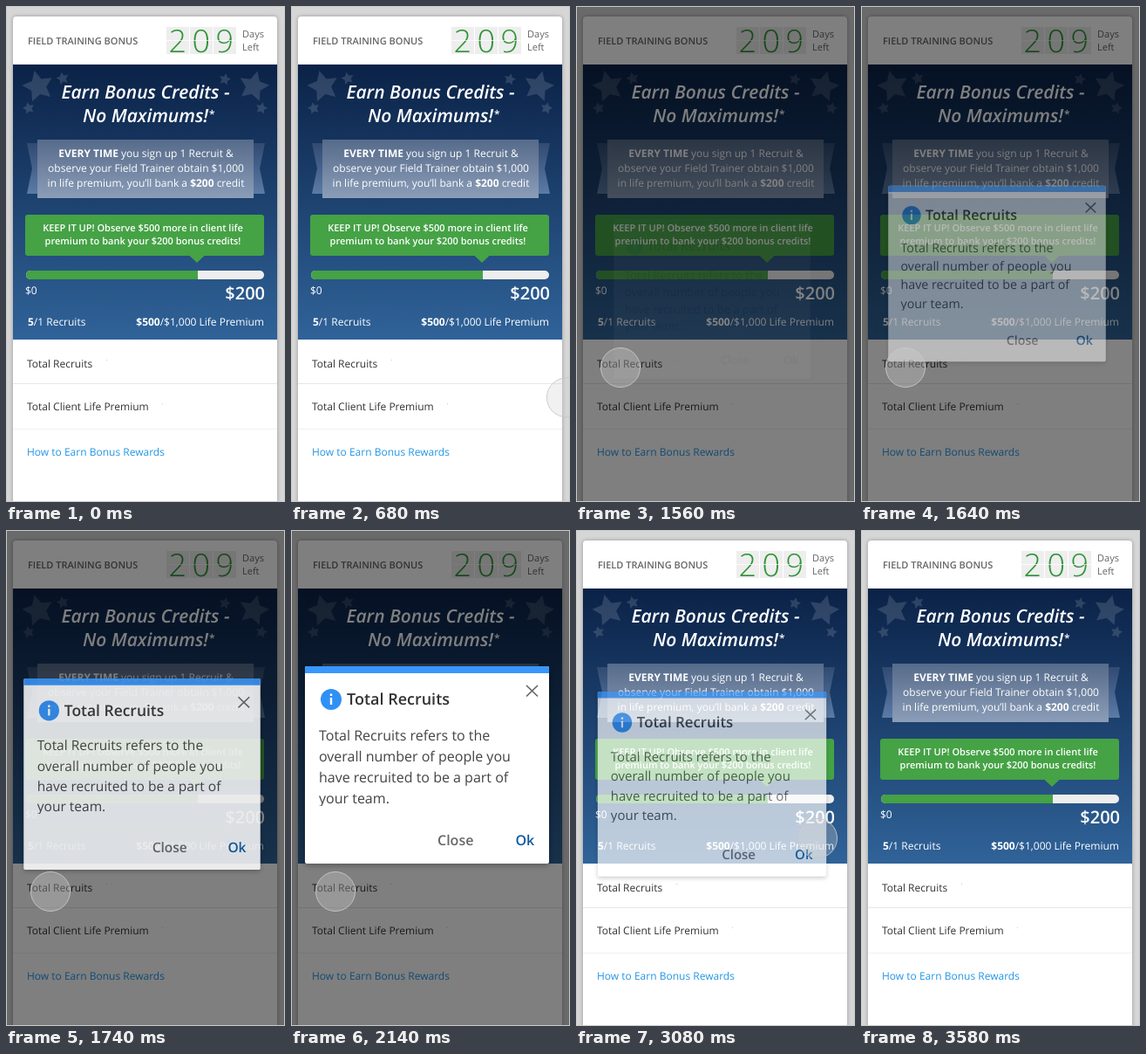
Animation, 320 px wide and 568 px high, one loop 4740 ms. Source, as an HTML page:

```html
<!DOCTYPE html>
<html lang="en">
<head>
<meta charset="utf-8">
<title>Field Training Bonus</title>
<style>
  html, body { margin: 0; height: 100%; overflow: hidden; background: #d6d6d6; }
  #stage { display: block; width: 100vw; height: 100vh; }
  text { font: 12px "Open Sans", sans-serif; fill: #333; text-rendering: geometricPrecision; }
  .mid { text-anchor: middle; }
  .end { text-anchor: end; }
  .semi { font-weight: 600; }
  .bold { font-weight: 700; }
  .white text, text.white { fill: #fff; }
  .small { font-size: 11px; }
  .grey { fill: #666; }
  .title { font-size: 21px; font-weight: 600; font-style: italic; }
  .digit { font-size: 36px; font-weight: 300; fill: #2f9437; }
  .body { font-size: 16px; fill: #444; }
  .panel { filter: drop-shadow(0 0 2px rgba(0, 0, 0, .3)); }
  .card { filter: drop-shadow(0 2px 3px rgba(0, 0, 0, .3)); }
</style>
</head>
<body>
<svg id="stage" viewBox="0 0 320 568">
  <defs>
    <linearGradient id="sky" x2="0" y2="1">
      <stop stop-color="#0b2247"/><stop offset="1" stop-color="#306399"/>
    </linearGradient>
    <linearGradient id="band" x2="0" y2="1">
      <stop stop-color="#566b8a"/><stop offset="1" stop-color="#8b9db8"/>
    </linearGradient>
    <linearGradient id="tail" x2="0" y2="1">
      <stop stop-color="#314a72"/><stop offset="1" stop-color="#5b7ba5"/>
    </linearGradient>
  </defs>

  <rect width="320" height="568" fill="#d6d6d6"/>
  <rect class="panel" x="8" y="12" width="303" height="570" rx="4" fill="#fff"/>

  <!-- header -->
  <text class="small semi grey" x="25" y="44">FIELD TRAINING BONUS</text>
  <g id="counter"></g>
  <text class="small grey" x="271" y="36">Days</text>
  <text class="small grey" x="271" y="51">Left</text>

  <!-- bonus area -->
  <rect x="8" y="67" width="303" height="315" fill="url(#sky)"/>
  <g id="stars" fill="#fff" fill-opacity=".14"></g>
  <g class="white">
    <text class="title mid" x="160" y="106">Earn Bonus Credits -</text>
    <text class="title mid" x="160" y="133">No Maximums!</text>
    <text class="semi" x="233" y="128">*</text>
    <path fill="url(#tail)" d="M24 157H36V215H24L30 186ZM284 157H297L291 186L297 215H284Z"/>
    <rect x="36" y="153" width="248" height="67" fill="url(#band)"/>
    <text class="mid" x="160.5" y="173"><tspan class="bold">EVERY TIME</tspan> you sign up 1 Recruit &amp;</text>
    <text class="mid" x="160.5" y="190">observe your Field Trainer obtain $1,000</text>
    <text class="mid" x="160.5" y="207">in life premium, you’ll bank a <tspan class="bold">$200</tspan> credit</text>

    <rect x="22" y="239" width="274" height="47" rx="3" fill="#45a245"/>
    <path d="M210 285.500H228L219 294Z" fill="#45a245"/>
    <text class="small semi mid" x="157" y="258">KEEP IT UP! Observe $500 more in client life</text>
    <text class="small semi mid" x="157" y="273">premium to bank your $200 bonus credits!</text>

    <rect x="23" y="303" width="273" height="10" rx="5" fill="#eee"/>
    <path d="M220 303H28a5 5 0 0 0 0 10H220Z" fill="#45a245"/>
    <text x="22" y="330">$0</text>
    <text class="semi end" style="font-size:20px" x="297" y="336">$200</text>
    <text x="25" y="366"><tspan class="bold">5</tspan>/1 Recruits</text>
    <text class="end" x="296" y="366"><tspan class="bold">$500</tspan>/$1,000 Life Premium</text>
  </g>

  <!-- list -->
  <text x="24" y="414">Total Recruits</text>
  <text x="24" y="463">Total Client Life Premium</text>
  <text x="24" y="515" style="fill:#2396e6">How to Earn Bonus Rewards</text>
  <path d="M8 432.500H311" stroke="#e6e6e6"/>
  <path d="M8 484.500H311" stroke="#f0f0f0"/>
  <path d="M115 405h1v1h-1zM179 455h1v1h-1z" fill="#ccc"/>

  <rect x=".5" y=".5" width="319" height="567" fill="none" stroke="#cacaca"/>
  <rect id="shade" x="1" y="1" width="318" height="566" fill-opacity=".5"/>

  <g id="modal">
    <rect class="card" x="16" y="156" width="280" height="226" rx="2" fill="#fff"/>
    <path d="M16 164V158a2 2 0 0 1 2-2H294a2 2 0 0 1 2 2V164Z" fill="#3797fd"/>
    <circle cx="46" cy="194" r="12" fill="#3090f5"/>
    <path d="M46 192V200M46 187.500V190" stroke="#fff" stroke-width="2.400"/>
    <text class="semi" style="font-size:18px" x="64" y="200">Total Recruits</text>
    <path d="M270 178L283 190.500M283 178L270 190.500" stroke="#666" stroke-width="1.700"/>
    <svg width="320" height="316">
      <text class="body" x="32" y="241">Total Recruits refers to the</text>
      <text class="body" x="32" y="265">overall number of people you</text>
      <text class="body" x="32" y="289">have recruited to be a part of</text>
      <text class="body" x="32" y="313">your team.</text>
    </svg>
    <text class="body semi" style="fill:#686868" x="168" y="361">Close</text>
    <text class="body semi" style="fill:#0c58a0" x="257.500" y="361">Ok</text>
  </g>

  <circle id="touch" r="22.500" fill="rgba(210,210,210,.3)" stroke="rgba(200,200,200,.9)"/>
</svg>
<script>
const LOOP = 4740, STEP = 20;
const $ = id => document.getElementById(id);
const shade = $('shade'), modal = $('modal'), touch = $('touch');

$('counter').innerHTML = [...'209'].map((digit, i) => {
  const x = 184 + 27 * i;
  return `<rect x="${x}" y="24" width="26" height="31" fill="#eee"/>
    <text class="digit mid" x="${x + 12.8}" y="53">${digit}</text>
    <path d="M${x} 39.500h26" stroke="#fff" stroke-opacity=".7"/>`;
}).join('');

function star(x, y, r, tilt) {
  const points = Array.from({ length: 10 }, (_, i) => {
    const a = (i * 36 - 90 + tilt) * Math.PI / 180, d = i % 2 ? r * .5 : r;
    return `${(x + d * Math.cos(a)).toFixed(1)},${(y + d * Math.sin(a)).toFixed(1)}`;
  });
  return `<polygon points="${points.join(' ')}"/>`;
}
$('stars').innerHTML =
  star(37, 92, 18.5, -14) + star(65, 83, 7.5, -14) + star(26, 117, 7, -14) +
  star(284, 92, 18, 14) + star(251, 84, 7, 14) + star(293, 117, 7, 14);

const clamp = v => Math.min(1, Math.max(0, v));
const part = (t, start, length) => clamp((t - start) / length);
const mix = (a, b, k) => a + (b - a) * k;
const easeOut = k => 1 - (1 - k) ** 3;
const easeInOut = k => k < .5 ? 4 * k ** 3 : 1 - 4 * (1 - k) ** 3;

// cubic-bezier(.25, .1, .25, 1)
function ease(x) {
  const curve = (s, a, b) => 3 * (1 - s) ** 2 * s * a + 3 * (1 - s) * s * s * b + s ** 3;
  let low = 0, high = 1;
  for (let i = 0; i < 24; i++) {
    const s = (low + high) / 2;
    if (curve(s, .25, .25) < x) low = s; else high = s;
  }
  return curve(low, .1, 1);
}

function touchAt(t) {
  if (t < 2120) {
    const k = easeOut(part(t, 660, 400));
    return [mix(360, 51, k), mix(454, 414, k)];
  }
  if (t < 3480) {
    const k = easeInOut(part(t, 2120, 540));
    return [mix(51, 277, k), mix(414, 353, k)];
  }
  const k = part(t, 3480, 100) ** 2;
  return [mix(277, 352, k), mix(353, 297, k)];
}

function openness(t) {
  if (t < 1560) return 0;
  if (t < 3080) return ease(part(t, 1542, 360));
  return 1 - ease(part(t, 3011, 330));
}

function draw(now) {
  const t = Math.floor(now % LOOP / STEP) * STEP;
  const [x, y] = touchAt(t);
  const pressed = t >= 1200 && t < 1340 || t >= 2900 && t < 3040;
  touch.setAttribute('transform', `translate(${x} ${y}) scale(${pressed ? .92 : 1})`);
  touch.setAttribute('visibility', t >= 680 && t < 3580 ? 'visible' : 'hidden');

  shade.setAttribute('visibility', t >= 1560 && t < 3080 ? 'visible' : 'hidden');
  const p = openness(t);
  modal.setAttribute('opacity', p);
  modal.setAttribute('transform',
    `translate(156 ${269 + 69 * (1 - p)}) scale(${.8 + .2 * p}) translate(-156 -269)`);
  requestAnimationFrame(draw);
}
draw(0);
</script>
</body>
</html>
```
